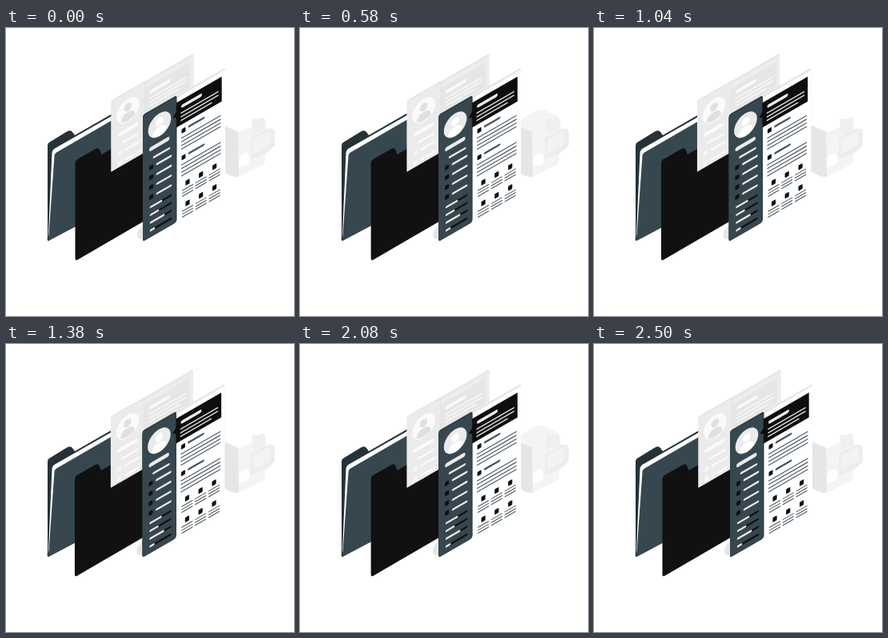
These frames come from a looping animation (360x360 px, 2540 ms). An HTML page with a canvas:

```html
<!DOCTYPE html>
<html lang="en">
<head>
<meta charset="utf-8">
<title>Resume and folder</title>
<style>
html, body { margin: 0; width: 100%; height: 100%; overflow: hidden; background: #fff; }
canvas { display: block; width: 100vmin; height: 100vmin; }
</style>
</head>
<body>
<canvas></canvas>
<script>
const LOOP = 2540, SHAKE = 1500, SLOPE = -0.577;
const canvas = document.querySelector('canvas');
const c = canvas.getContext('2d');
const ratio = window.devicePixelRatio || 1;
canvas.width = canvas.height = 360 * ratio;
c.scale(ratio, ratio);
c.lineCap = 'round';

const dark = {
  edge: '#e6e6e6', panelEdge: '#263238', panel: '#37474f', page: '#fff', head: '#0e0e0e',
  ink: '#111', text: '#45545e', light: '#ebebeb', disc: '#ebebeb', person: '#fff'
};
const pale = {
  edge: '#e6e6e6', panelEdge: '#e2e2e2', panel: '#ebebeb', page: '#ededed', head: '#e6e6e6',
  ink: '#f6f6f6', text: '#fafafa', light: '#fafafa', disc: '#fafafa', person: '#e0e0e0'
};

function shape(d, fill) {
  c.fillStyle = fill;
  c.fill(new Path2D(d));
}

function box(x, y, w, h, fill, r = 0) {
  c.fillStyle = fill;
  c.beginPath();
  c.roundRect(x, y, w, h, r);
  c.fill();
}

function bar(x1, x2, y, width, color) {
  c.strokeStyle = color;
  c.lineWidth = width;
  c.beginPath();
  c.moveTo(x1, y);
  c.lineTo(x2, y);
  c.stroke();
}

function disc(x, y, r, fill) {
  c.fillStyle = fill;
  c.beginPath();
  c.arc(x, y, r, 0, 7);
  c.fill();
}

// A resume in its own flat coordinates, leaned into the isometric plane.
function resume(x, y, height, p) {
  c.save();
  c.transform(1, SLOPE, 0, 1, x, y);
  c.beginPath();
  c.rect(-2, -8, 110, height + 8);
  c.clip();

  box(40, 0, 63, 70, p.edge, 2);
  box(42, 3, 61, 155, p.page);
  box(0, -0.5, 42.5, 158.5, p.panelEdge, 3);
  box(0, 1, 41.5, 157, p.panel, 3);

  disc(21, 24, 14.3, p.disc);
  disc(21, 20, 4.8, p.person);
  shape('M12 34Q13 26 21 26T30 34Q21 40 12 34', p.person);
  bar(10.5, 31, 48, 5, p.light);
  bar(14, 33, 60.5, 2.6, p.light);
  for (let i = 0; i < 4; i++) {
    const v = 71.3 + i * 12.3, split = [23, 19, 26, 14][i], w = 120.5 + i * 9.7;
    box(8, v - 2.7, 5, 5.4, p.ink, 1);
    bar(18, 35, v, 2.6, p.light);
    bar(10, 35, w, 2.6, p.ink);
    bar(10, split, w, 2.6, p.light);
  }

  box(42, 8.7, 56.7, 31, p.head);
  shape('M43 19L37.5 25L43 28Z', p.head);
  bar(50, 72, 17, 4, p.light);
  for (let i = 0; i < 3; i++) bar(48, i < 2 ? 94 : 86, 25 + i * 4.6, 1.5, p.light);

  for (const v of [48.3, 81.8]) {
    box(48.5, v - 2.7, 5, 5.4, p.ink, 1);
    bar(58, 76, v - 1, 2.6, p.text);
    for (let i = 0; i < 4; i++) bar(48.5, 97, v + 8.3 + i * 4.6, 1.3, p.text);
  }
  for (const v of [116, 142])
    for (const u of [56, 72.7, 89.6]) {
      box(u - 2.6, v - 3, 5.2, 6, p.ink, 1);
      for (let i = 0; i < 3; i++) bar(u - 6.5, u + 6.5, v + 6.7 + i * 3.6, 1.2, p.text);
    }
  c.restore();
}

function backFolder() {
  shape('M52 147Q52 144 54 143L76 129.5Q81 127 83 130L86 134L140 103V220L53 266Q51 266 52 260Z', '#263238');
  shape('M57.5 156Q58 152 61 150.5L140 105.5V120L64 160L54 262L53 258Z', '#fff');
  shape('M60.5 160Q60.5 157 64 155L140 111V220L53 266Z', '#37474f');
}

function frontFolder() {
  shape('M86.5 169Q86.5 166 88.5 164.5L112 151Q116 149 117 152L119.5 158L175 126V240L89 290Q86.5 291 86.5 288Z', '#111');
}

function machine(topVisible) {
  if (topVisible) shape('M270 119Q278 112 293 104Q301 100 309 104L322 111Q326 113 326 126L291 132Z', '#f4f4f4');
  shape('M268 120L291 130V186Q284 187 278 183L268 178Z', '#e6e6e6');
  shape('M290 131L324 116V166Q323 170 319 172L291 186Z', '#f4f4f4');
  shape('M307 113Q315 116 323 111L325 126L309 132Z', '#efefef');
  shape('M306 137L327 126Q336 125 336 131V147L326 156L306 164Z', '#ededed');
  shape('M309 139L330 129V146L309 157Z', '#f3f3f3');
  shape('M291 166Q293 157 301 156Q308 163 302 171L291 174Z', '#fff');
}

// Horizontal shake: ten equal linear stages.
const stops = [0, -1, 2, -4, 4, -4, 4, -4, 2, -1, 0];
function shift(t) {
  const s = t % SHAKE / SHAKE * 10, i = Math.floor(s);
  return 0.72 * (stops[i] + (stops[i + 1] - stops[i]) * (s - i));
}

function draw(now) {
  const x = shift(now % LOOP);
  c.clearRect(0, 0, 360, 360);
  backFolder();
  machine(x > 1.5);
  c.save();
  c.translate(x, 0);
  frontFolder();
  resume(131.5, 91, 88.5, pale);
  shape('M172 246Q163 252 164 260Q165 265 172 264Z', '#e6e6e6');
  resume(171, 109, 162, dark);
  c.restore();
  requestAnimationFrame(draw);
}
requestAnimationFrame(draw);
</script>
</body>
</html>
```
